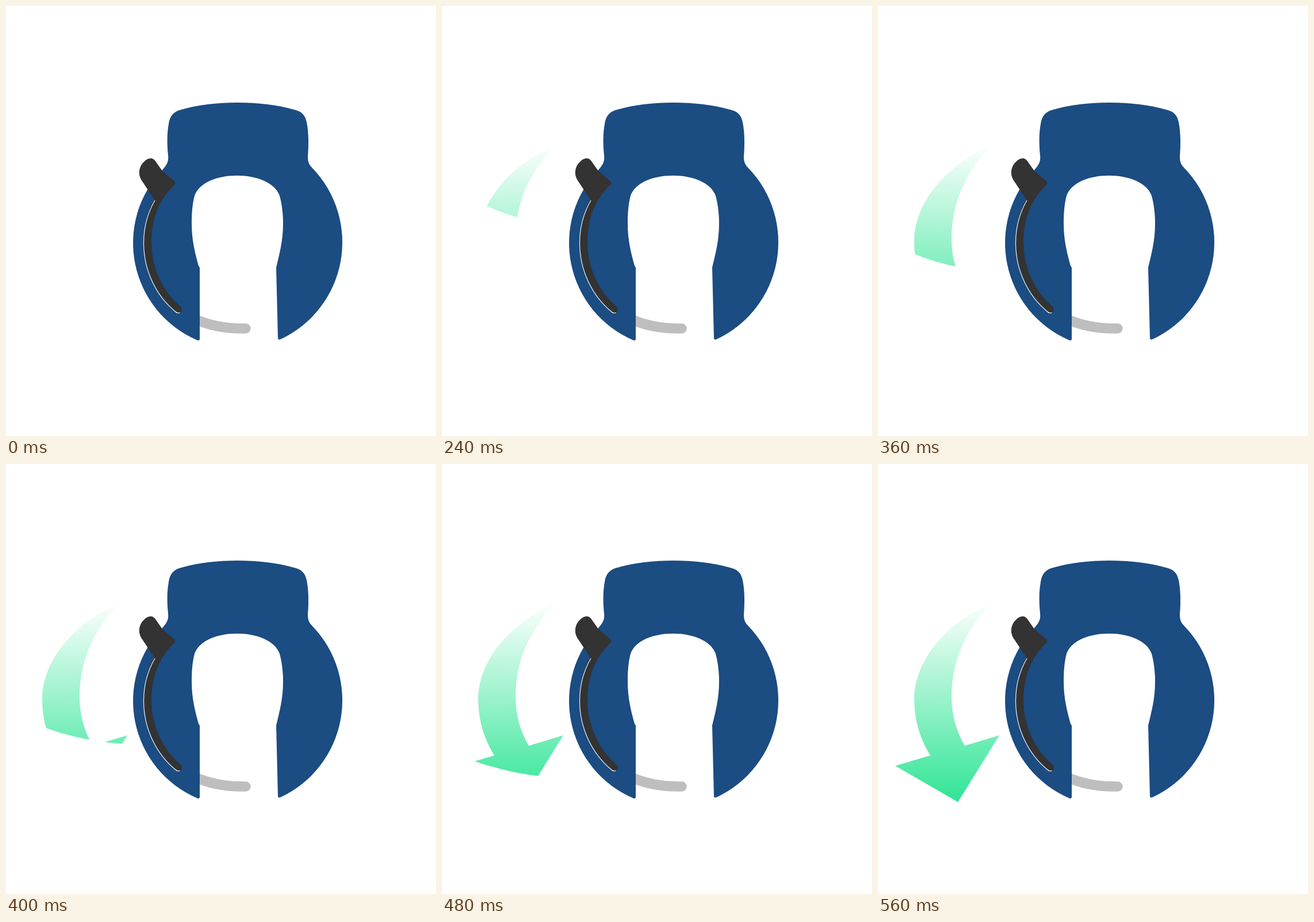
Recreate the animation shown at these times as an HTML page with a canvas. Size 748x748 px, loop 1 s.

```html
<!DOCTYPE html>
<html lang="en">
<head>
<meta charset="utf-8">
<title>Ring lock</title>
<style>
  html, body { margin: 0; width: 100%; height: 100%; overflow: hidden; background: #fff; }
  canvas { display: block; }
</style>
</head>
<body>
<canvas id="stage" width="748" height="748"></canvas>
<script>
const ctx = document.getElementById('stage').getContext('2d');
const LOOP = 1000, STEP = 40, END = 560;

const body = new Path2D(`M337 579 Q337 582.5 333 581.5 A184 184 0 0 1 273 284
  C281 275 283 269 282 260 C280 240 280 222 283 205 C285 190 293 183 306 180
  C360 164 445 164 500 180 C513 183 520 188 523 202 C527 222 526.5 245 525 262
  C525 272 528 277 533 282 A186 186 0 0 1 478 579.5 Q473 582 473 577
  L470 455 C476 430 482 408 482 378 C482 362 480 345 476 330
  C468 308 438 295 402 295 C365 295 336 308 328 330 C324 345 323 362 323 378
  C323 408 329 430 335 452 L337 455 Z`);
const bolt = new Path2D('M325 543 Q365 562 417 561');
const arm = new Path2D('M265 336 C250 362 246.5 388 246.5 412 C246.5 457 267 500 299.5 528');
const glint = new Path2D('M259 338 C244 364 239.5 388 239.5 412 C239.5 460 261 504 295 532 Q298 535 302 533.5');
const knob = new Path2D(`M259 338 L235 302 C229 291 232 279 239 272 C246 264 255 262 260 270
  L272 287 L293 305 Q296 308 293 311 C285 318 279 326 273 336 Q267 341 259 338 Z`);
const arrow = new Path2D(`M197 243 C125 272 63 338 63 410 C63 445 73 478 91 507
  L30 525 L139 588 L211 472 L151 490 C136 465 128 436 128 405 C128 340 155 285 197 243 Z`);

const fade = ctx.createLinearGradient(0, 236, 0, 598);
fade.addColorStop(0, 'rgba(42, 228, 146, 0)');
fade.addColorStop(1, 'rgba(42, 228, 146, 1)');

function stroke(path, color, width) {
  ctx.strokeStyle = color;
  ctx.lineWidth = width;
  ctx.stroke(path);
}

function fill(path, color) {
  ctx.fillStyle = color;
  ctx.fill(path);
}

function drawLock() {
  ctx.lineCap = 'round';
  stroke(bolt, '#bebebe', 17.5);
  fill(body, '#1b4c82');
  stroke(arm, '#333', 13);
  stroke(glint, '#fff', 1.1);
  fill(knob, '#333');
}

// A circle growing at 60 ticks per second, shown every STEP ms.
function wipeRadius(t) {
  const shown = Math.floor(Math.min(t, END) / STEP) * STEP;
  const ticks = Math.floor(shown * 0.06 - 0.1);
  return 208.4 + 11.8 * ticks;
}

function drawArrow(t) {
  ctx.save();
  ctx.beginPath();
  ctx.arc(233, 8, wipeRadius(t), 0, Math.PI * 2);
  ctx.clip();
  fill(arrow, fade);
  ctx.restore();
}

function render(t) {
  ctx.fillStyle = '#fff';
  ctx.fillRect(0, 0, 748, 748);
  drawLock();
  drawArrow(t);
}

const begin = performance.now();

function tick() {
  render((performance.now() - begin) % LOOP);
  requestAnimationFrame(tick);
}
tick();
</script>
</body>
</html>
```
